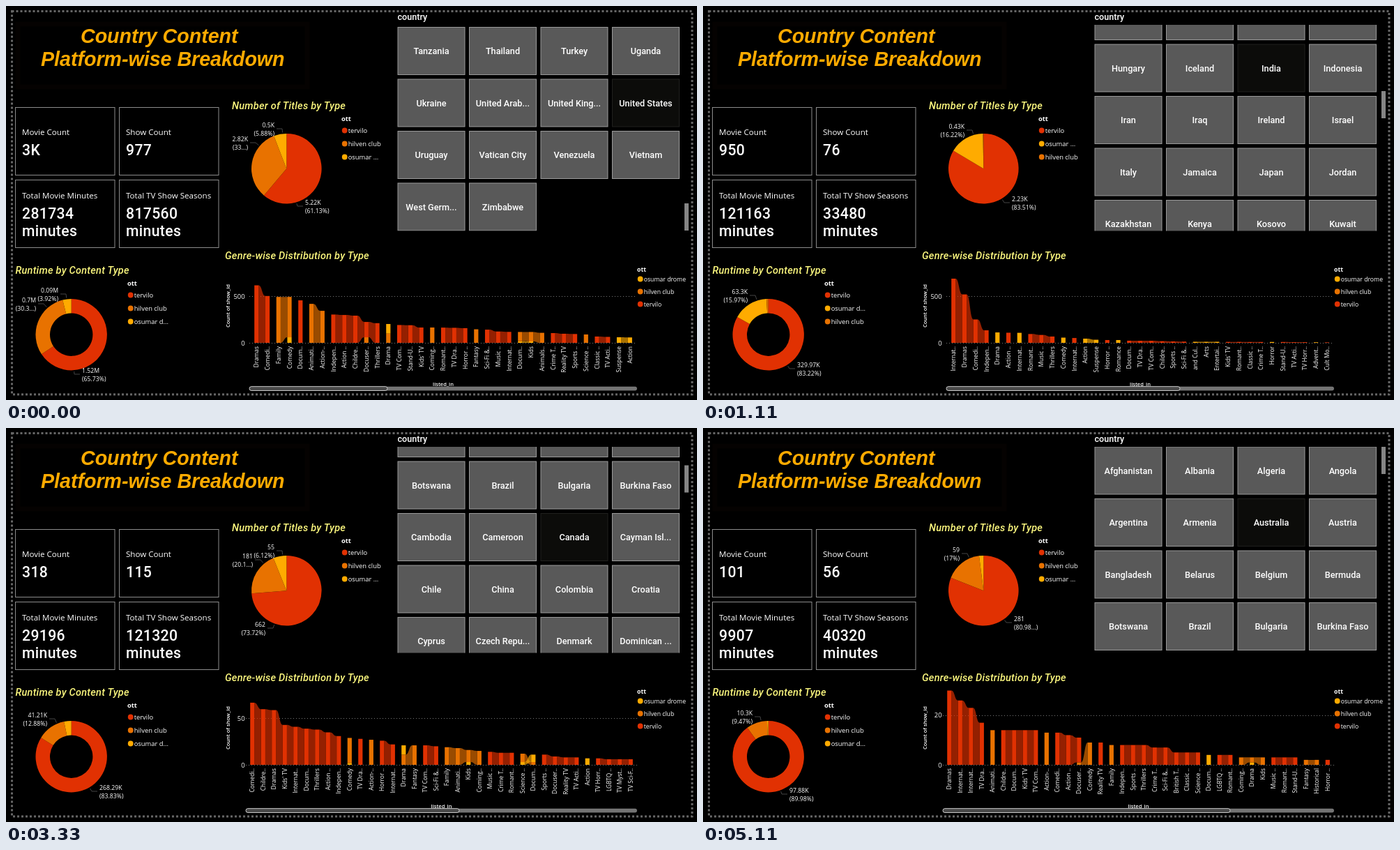
Recreate the animation shown at these times as an HTML page. Size 991 px wide and 565 px high, loop 5.55 s.

```html
<!DOCTYPE html>
<html lang="en">
<head>
<meta charset="utf-8">
<title>Country content dashboard</title>
<style>
html, body { margin: 0; width: 100%; height: 100%; overflow: hidden; background: #000; }
svg { display: block; width: 100vw; height: 100vh; }
text { fill: #fff; font-family: "Open Sans", "Noto Sans", sans-serif; font-weight: 500; }
.title { font: italic bold 28.6px "Liberation Sans", Arial, sans-serif; fill: #ffab00; }
.head { font: italic 500 14.5px Roboto, sans-serif; letter-spacing: .25px; fill: #fbf77e; }
.value { font: 500 21.2px Roboto, sans-serif; letter-spacing: .35px; }
.tile { font: 500 12.7px Roboto, sans-serif; text-anchor: middle; }
.field { font: 500 12.6px Roboto, sans-serif; }
.card { font-size: 11.6px; }
.key { font-size: 9.4px; }
.small { font-size: 8.7px; }
.bold { font-weight: 700; }
.axis { font-size: 8.4px; }
.name { font-size: 7.5px; font-weight: 600; text-anchor: middle; }
.end { text-anchor: end; }
</style>
</head>
<body>
<svg id="stage" viewBox="0 0 991 565" preserveAspectRatio="none"></svg>
<script>
const COLORS = { r: '#e13102', o: '#e87200', y: '#ffab00' };
const NAMES = { r: 'tervilo', o: 'hilven club', y: 'osumar drome' };
const HOLD = 1110;

// Bars are "label=colour+value", stacked from the bottom up.
const scenes = [
  {
    cards: ['3K', '977', '281734', '817560'], order: 'roy',
    pie: [61.13, 32.99, 5.88], ring: [65.73, 30.35, 3.92],
    pieTags: [['0.5K', '(5.88%)', 385, 174], ['2.82K', '(33...)', 347, 194], ['5.22K', '(61.13%)', 429, 285]],
    ringTags: [['0.09M', '(3.92%)', 75, 411], ['0.7M', '(30.3...)', 43, 425], ['1.52M', '(65.73%)', 109, 526]],
    top: 30.5, thumb: 283, chosen: 'United States',
    tiles: 'Tanzania,Thailand,Turkey,Uganda,Ukraine,United Arab...,United King...,United States,Uruguay,Vatican City,Venezuela,Vietnam,West Germ...,Zimbabwe',
    tick: 500, unit: .133, left: 349, scroll: 547,
    bars: "Dramas=r620,Comedi..=r505,Family=o495,Comedy=y60o435,Docum..=r458,Animati..=o420,Action-..=o345,Indepen..=r305,Action ..=r300,Childre..=r293,Docuser..=o60r165,Thrillers=r212,Drama=o100y103,TV Com..=r192,Stand-U..=r190,Kids' TV=r165,Coming..=o165,Romant..=r164,TV Dra..=r162,Horror ..=r158,Fantasy=o146,Sci-Fi &..=r142,Music ..=r122,Internat..=r118,Docum..=y18o99,Kids=y15o102,Animals..=o108,Crime T..=r105,Reality TV=r98,Sports ..=r95,Science ..=o90,Classic ..=r68,TV Acti..=r64,Suspense=y60,Action=y58"
  },
  {
    cards: ['950', '76', '121163', '33480'], order: 'ryo',
    pie: [83.51, 16.22, .27], ring: [83.22, 15.97, .81],
    pieTags: [['0.43K', '(16.22%)', 375, 176], ['2.23K', '(83.51%)', 443, 280]],
    ringTags: [['63.3K', '(15.97%)', 64, 413], ['329.97K', '(83.22%)', 135, 518]],
    top: -19.5, thumb: 122, chosen: 'India',
    tiles: ',,,,Hungary,Iceland,India,Indonesia,Iran,Iraq,Ireland,Israel,Italy,Jamaica,Japan,Jordan,Kazakhstan,Kenya,Kosovo,Kuwait',
    tick: 500, unit: .133, left: 349, scroll: 684,
    bars: "Internat..=r692,Dramas=r522,Comedi..=r252,Indepen..=r135,Drama=y112,Action ..=r109,Internat..=y108,Romant..=r95,Music ..=r85,Thrillers=r68,Comedy=y56,Internat..=r52,Action=y45,Suspense=y33,Horror ..=r30,Romance=y30,Docum..=r23,TV Dra..=r22,TV Com..=r22,Childre..=r18,Sports ..=r15,Sci-Fi &..=r13,and Cul..=y11,Arts=y11,Entertai..=y11,Kids' TV=r10,Romant..=r10,Classic ..=r9,Crime T..=r9,Horror=y9,Stand-U..=r9,TV Acti..=r7,TV Horr..=r7,Advent..=y6,Cult Mo..=r5"
  },
  {
    cards: ['108', '42', '11177', '19800'], order: 'roy',
    pie: [91.69, 6.37, 1.94], ring: [86.84, 12.23, .93],
    pieTags: [['23', '(6.37%)', 378, 175], ['331', '(91.69%)', 429, 285]],
    ringTags: [['9.46K', '(12.23%)', 68, 412], ['67.17K', '(86.84%)', 129, 521]],
    top: 13.5, thumb: 68, chosen: 'China',
    tiles: 'Cambodia,Cameroon,Canada,Cayman Isl...,Chile,China,Colombia,Croatia,Cyprus,Czech Repu...,Denmark,Dominican ...,East Germa...,Ecuador,Egypt,Ethiopia,,,,',
    tick: 50, unit: 1.33, left: 344, scroll: 862,
    bars: "Internat..=r64,Action ..=r58,Internat..=r32,Dramas=r27,Comedi..=r26,Romant..=r17,TV Dra..=r15,Childre..=r13,Sci-Fi &..=r12,TV Com..=r9,Romant..=r8,Animati..=o7,Comedy=y2o5,Action-..=o6,Thrillers=r6,TV Acti..=r6,Docum..=r5,Kids' TV=r5,Teen TV..=r5,Kids=o2y2,Crime T..=r3,TV Sci-F..=r3,Anime ..=r2,British T..=r2,Family=o2,Horror ..=r2,Indepen..=r2,Music ..=r2,Action=y1,Animas..=y1,Anime F..=r1,Cult Mo..=r1,Docuser..=r1,Drama=y1,Internat..=y1,Korean ..=r1"
  },
  {
    cards: ['318', '115', '29196', '121320'], order: 'roy',
    pie: [73.72, 20.16, 6.12], ring: [83.83, 12.88, 3.29],
    pieTags: [['55', '(6.12%)', 385, 174], ['181', '(20.1...)', 354, 187], ['662', '(73.72%)', 372, 285]],
    ringTags: [['41.21K', '(12.88%)', 59, 415], ['268.29K', '(83.83%)', 134, 519]],
    top: -26.5, thumb: 53.5, chosen: 'Canada',
    tiles: ',,,,Botswana,Brazil,Bulgaria,Burkina Faso,Cambodia,Cameroon,Canada,Cayman Isl...,Chile,China,Colombia,Croatia,Cyprus,Czech Repu...,Denmark,Dominican ...',
    tick: 50, unit: 1.33, left: 344, scroll: 650,
    bars: "Comedi..=r67,Childre..=r60,Dramas=r59,Kids' TV=r43,Internat..=r41,Docum..=r39,Thrillers=r38,Action ..=r35,Indepen..=r31,Comedy=y2o27,TV Dra..=r28,Action-..=o27,Horror ..=r26,Internat..=r22,Drama=o11y10,Fantasy=o21,TV Com..=r21,Sci-Fi &..=r20,Family=o19,Animati..=o18,Kids=y3o13,Coming..=o15,Music ..=r14,Crime T..=r13,Romant..=r13,Science ..=y3o9,Docum..=o3y8,Sports ..=r11,Docuser..=r9,Reality TV=r8,TV Acti..=r8,Action=y7,TV Horr..=r7,LGBTQ ..=r6,TV Myst..=r6,TV Sci-F..=r6"
  },
  {
    cards: ['101', '56', '9907', '40320'], order: 'roy',
    pie: [80.98, 17, 2.02], ring: [89.98, 9.47, .55],
    pieTags: [['59', '(17%)', 368, 178], ['281', '(80.98...)', 446, 277]],
    ringTags: [['10.3K', '(9.47%)', 71, 412], ['97.88K', '(89.98%)', 124, 523]],
    top: 27, thumb: 27, chosen: 'Australia',
    tiles: 'Afghanistan,Albania,Algeria,Angola,Argentina,Armenia,Australia,Austria,Bangladesh,Belarus,Belgium,Bermuda,Botswana,Brazil,Bulgaria,Burkina Faso',
    tick: 20, unit: 3.55, left: 344, scroll: 756,
    bars: "Dramas=r30,Internat..=r26,Internat..=r23,TV Dra..=r17,Animati..=o14,Childre..=r14,Docum..=r14,Kids' TV=r14,TV Com..=r14,Action-..=o13,Comedi..=r13,Action ..=r12,Docuser..=o1r10,Comedy=o9,Reality TV=r9,Family=o8,Indepen..=r8,Sports ..=r8,Thrillers=r8,Crime T..=r7,Sci-Fi &..=r7,British T..=r5,Classic ..=r5,Science ..=r5,Docum..=y4,LGBTQ ..=r4,Romant..=r4,Coming..=o3,Drama=y1o2,Kids=o3,Music ..=r3,Romant..=r3,Stand-U..=r3,Fantasy=o2,Historical=o2,Horror ..=r2"
  }
];

const text = (s, x, y, cls, extra = '') => `<text x="${x}" y="${y}" class="${cls}" ${extra}>${s}</text>`;
const rect = (x, y, w, h, extra) => `<rect x="${x}" y="${y}" width="${w}" height="${h}" ${extra}/>`;
const path = (d, extra) => `<path d="${d}" ${extra}/>`;
const upright = (s, x, y, cls) => text(s, x, y, cls, `transform="rotate(-90 ${x} ${y})"`);

function sectors(cx, cy, R, r, shares, order) {
  let sum = 0;
  const at = (rad, share) => {
    const a = share / 50 * Math.PI;
    return `${cx + rad * Math.sin(a)} ${cy - rad * Math.cos(a)}`;
  };
  return shares.map((share, i) => {
    const a = sum, b = sum += share, big = +(share > 50);
    return path(`M${at(R, a)}A${R} ${R} 0 ${big} 1 ${at(R, b)}L${at(r, b)}` +
      (r ? `A${r} ${r} 0 ${big} 0 ${at(r, a)}` : '') + 'Z', `fill="${COLORS[order[i]]}"`);
  }).join('');
}

// Two-line labels with a leader to the nearest point of the circle.
function tags(list, cx, cy, R) {
  return list.map(([a, b, x, y]) => {
    const dir = x < cx ? 1 : -1, cls = 'small' + (dir > 0 ? ' end' : '');
    const ex = x + dir * 11, ey = y + 2, k = R / Math.hypot(ex - cx, ey - cy);
    return path(`M${cx + (ex - cx) * k} ${cy + (ey - cy) * k}L${ex} ${ey}H${x + dir * 3}`,
      'fill="none" stroke="#444"') + text(a, x, y, cls) + text(b, x, y + 12, cls);
  }).join('');
}

function legend(x, y, order, step, cls, cut) {
  return text('ott', x, y, cls + ' bold') + [...order].map((c, i) => {
    const cy = y + (step === 19 ? 14 : 11.5) + i * step;
    const label = c === 'y' && cut ? NAMES.y.slice(0, cut) + '...' : NAMES[c];
    return `<circle cx="${x + 4.7}" cy="${cy - .5}" r="3.9" fill="${COLORS[c]}"/>` + text(label, x + 9.7, cy + 3, cls);
  }).join('');
}

function cards(values) {
  const heads = ['Movie Count', 'Show Count', 'Total Movie Minutes', 'Total TV Show Seasons'];
  return values.map((v, i) => {
    const x = 13.5 + i % 2 * 149, low = i > 1, y = low ? 249.5 : 145.5;
    return rect(x, y, 142.5, 97, 'fill="none" stroke="#8c8c8c"') +
      text(heads[i], x + 9.5, low ? 275.5 : 185, 'card') + text(v, x + 9.5, low ? 305 : 214, 'value') +
      (low ? text('minutes', x + 9.5, 330, 'value') : '');
  }).join('');
}

function slicer(s) {
  const tiles = s.tiles.split(',').map((name, i) => {
    const x = 562 + i % 4 * 102.5, y = s.top + Math.floor(i / 4) * 74.5;
    const look = name === s.chosen ? 'fill="#0c0c0a" stroke="#20201e"' : 'fill="#595959" stroke="#9a9a9a"';
    return rect(x, y, 96, 68, look) + text(name, x + 48, y + 38.7, 'tile');
  }).join('');
  return text('country', 561.5, 20, 'field') + `<g clip-path="url(#list)">${tiles}</g>` +
    rect(973, s.thumb, 6, 39, 'fill="#858585"');
}

function chart(s) {
  const base = 483, half = 3.1, wide = s.left === 349;
  const x0 = wide ? 359.3 : 353.3, step = wide ? 15.75 : 15.5;
  const tickY = base - s.tick * s.unit, mid = (s.left + 905) / 2;
  let ribbons = '', bars = '', labels = '', last = {};
  s.bars.split(',').forEach((bar, i) => {
    const [label, stack] = bar.split('='), x = x0 + i * step, now = {};
    let low = base;
    for (const [, c, n] of stack.matchAll(/([roy])(\d+)/g)) {
      const high = low - n * s.unit;
      now[c] = [low, high];
      bars += rect(x - half, high, half * 2, low - high, `fill="${COLORS[c]}"`);
      if (last[c]) {
        const [l, h] = last[c], a = x - step + half, b = x - half, m = (a + b) / 2;
        ribbons += path(`M${a} ${h}C${m} ${h} ${m} ${high} ${b} ${high}V${low}C${m} ${low} ${m} ${l} ${a} ${l}Z`,
          `fill="${COLORS[c]}" opacity=".66"`);
      }
      low = high;
    }
    last = now;
    labels += upright(label, x + 3, 488, 'axis end');
  });
  const grid = [tickY, base].map(y =>
    path(`M${s.left} ${Math.floor(y) + .5}H905`, 'stroke="#777" stroke-dasharray="1 3"')).join('');
  return grid + ribbons + bars + labels +
    text(s.tick, 342.5, tickY + 3.2, 'key end') + text(0, 342.5, base + 3.5, 'key end') +
    upright('Count of show_id', 320.5, 430, 'name') + text('listed_in', mid, 544.5, 'name') +
    rect(s.left, 545.7, 905 - s.left, 5.8, 'rx="2.9" fill="#747474"') +
    rect(s.left, 545.7, s.scroll - s.left, 5.8, 'rx="2.9" fill="#484848" stroke="#c8c8c8"');
}

const frame = '<clipPath id="list"><rect x="561" y="27" width="406" height="295.5"/></clipPath>' +
  rect(8.5, 7.5, 975.5, 549.5, 'fill="none" stroke="#666" stroke-width="3" stroke-dasharray="3 3"') +
  rect(17, 26, 415, 90, 'fill="none" stroke="#050201" stroke-width="7"') +
  text('Country Content', 107, 53, 'title') + text('Platform-wise Breakdown', 50, 86, 'title') +
  text('Number of Titles by Type', 324, 148, 'head') + text('Runtime by Content Type', 13.5, 383.5, 'head') +
  text('Genre-wise Distribution by Type', 314, 363, 'head');

const draw = s => frame + cards(s.cards) + slicer(s) +
  sectors(402.3, 233.2, 50.3, 0, s.pie, s.order) + tags(s.pieTags, 402.3, 233.2, 52) +
  sectors(93.7, 471.2, 51.2, 30.7, s.ring, s.order) + tags(s.ringTags, 93.7, 471.2, 53) +
  legend(481, 165, s.order, 19, 'key', 7) + legend(174, 401, s.order, 19, 'key', 8) +
  legend(905, 380.5, 'yor', 18, 'small') + chart(s);

const stage = document.getElementById('stage');
let start, shown;
function tick(now) {
  start ??= now;
  const i = Math.floor((now - start) / HOLD) % scenes.length;
  if (i !== shown) stage.innerHTML = draw(scenes[shown = i]);
  requestAnimationFrame(tick);
}
requestAnimationFrame(tick);
</script>
</body>
</html>
```
